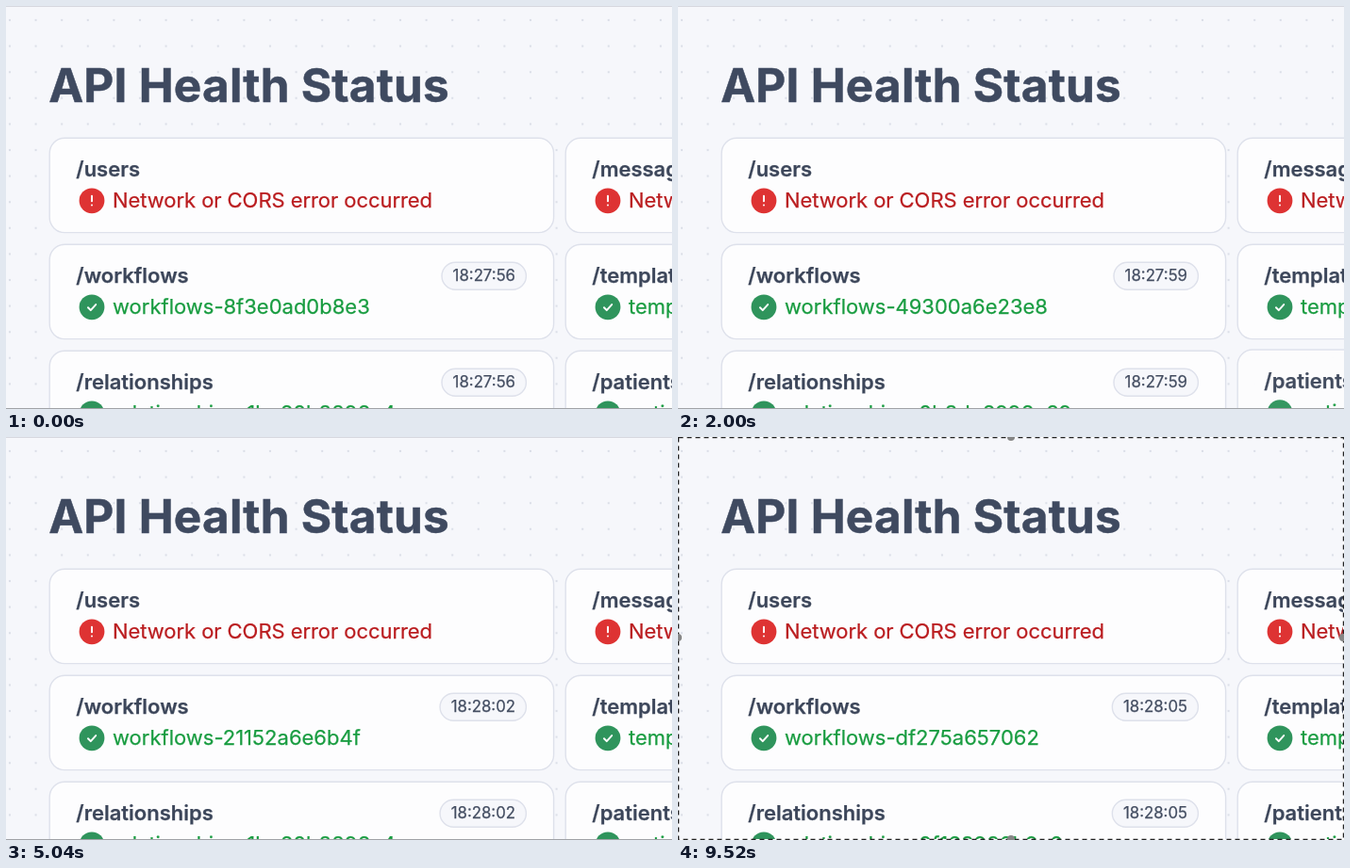
These frames come from a looping animation (706x428 px, 9600 ms). An HTML page:

```html
<!DOCTYPE html>
<html lang="en">
<head>
<meta charset="utf-8">
<title>API Health Status</title>
<style>
  html, body { margin: 0; width: 100%; height: 100%; overflow: hidden; background: #f6f7fb; }
  svg { display: block; width: 706px; height: 428px; }
  text { font-family: Inter, sans-serif; font-optical-sizing: none; white-space: pre;
         fill: currentColor; stroke: currentColor; stroke-width: .25; }
  .title { font-size: 49.5px; font-weight: 700; letter-spacing: .2px; color: #3f4a60; stroke-width: .5; }
  .label { font-size: 22px; font-weight: 600; color: #3c465a; }
  .message { font-size: 22px; font-weight: 400; color: #189c40; }
  .message.failed { color: #ba1c1f; letter-spacing: -.06px; }
  .time { font-size: 16.8px; font-weight: 400; color: #434d61; text-anchor: end; }
  .box { fill: #fdfdfe; stroke: #dee1eb; stroke-width: 1.4; }
  .pill { fill: #f6f7fb; }
  .mark { fill: none; stroke: #fff; stroke-width: 2; stroke-linecap: round; stroke-linejoin: round; }
  .flash { fill: none; stroke: #82c8c6; stroke-width: 3; }
</style>
</head>
<body>
<svg id="stage" viewBox="0 0 706 428">
  <defs>
    <pattern id="dots" x="-9.8" y="1.2" width="27.6" height="27.6" patternUnits="userSpaceOnUse">
      <circle cx="13.8" cy="13.8" r="1.2" fill="#dcdfe8"/>
    </pattern>
  </defs>
  <rect width="706" height="428" fill="#f6f7fb"/>
  <rect width="706" height="428" fill="url(#dots)"/>
  <text class="title" x="45.2" y="102.3">API Health Status</text>
  <g id="cards"></g>
  <rect width="706" height="1" fill="#d6d8df"/>
  <rect y="427" width="706" height="1" fill="#a0a2a6"/>
  <g id="flashes"><path class="flash" d="M0 1.5H706"/></g>
  <g id="selection">
    <rect x=".5" y=".5" width="705" height="427" fill="none" stroke="#fff"/>
    <rect x=".5" y=".5" width="705" height="427" fill="none" stroke="#222" stroke-width="1.4" stroke-dasharray="5 4"/>
    <g fill="#858585">
      <circle cx="353" cy="0" r="4"/><circle cx="353" cy="427" r="4"/>
      <circle cx="0" cy="213" r="4"/><circle cx="705" cy="213" r="4"/>
    </g>
  </g>
</svg>
<script>
const LOOP = 9600, STEP = 80;
const CLEAR_AT = 960, ENTER_AT = 1050, STAGGER = 120, ENTER_TIME = 370, DROP = 21.5;
const FLASH_STARTS = [4060, 7060], FLASH_TIME = 280, SELECT_AT = 8240;
const PITCH_X = 547, PITCH_Y = 113;

const snapshots = [
  { from: 0, time: '18:27:56', workflows: '8f3e0ad0b8e3', relationships: '1be60b8896e4' },
  { from: CLEAR_AT, time: '18:27:59', workflows: '49300a6e23e8', relationships: '0b8de6996e69' },
  { from: FLASH_STARTS[0], time: '18:28:02', workflows: '21152a6e6b4f', relationships: '1be60b8896e4' },
  { from: FLASH_STARTS[1], time: '18:28:05', workflows: 'df275a657062', relationships: '0f168986b9e0' }
];
const names = ['users', 'messages', 'workflows', 'templates', 'relationships', 'patients'];
const byId = id => document.getElementById(id);

function add(parent, tag, attrs, content = '') {
  const node = document.createElementNS('http://www.w3.org/2000/svg', tag);
  for (const key in attrs) node.setAttribute(key, attrs[key]);
  node.textContent = content;
  return parent.appendChild(node);
}

function makeCard(name, index) {
  const x = index % 2 * PITCH_X, y = Math.floor(index / 2) * PITCH_Y;
  const failed = index < 2;
  const group = add(byId('cards'), 'g');
  add(group, 'rect', { class: 'box', x: 46.2, y: 140.2, width: 534.4, height: 100.4, rx: 16 });
  add(group, 'text', { class: 'label', x: 74.3, y: 181 }, '/' + name);
  add(group, 'circle', { cx: 91, cy: 206.8, r: 13.4, fill: failed ? '#de3333' : '#2f945c' });
  add(group, 'path', { class: 'mark', d: failed ? 'M91 201.8v5.5M91 211.5v.1' : 'M87 207.3l2.8 2.8 5.4-6' });
  const message = add(group, 'text',
    { class: failed ? 'message failed' : 'message', x: 113, y: 214.2 },
    'Network or CORS error occurred');
  const flashes = add(byId('flashes'), 'g', { transform: `translate(${x} ${y})` });
  add(flashes, 'rect', { class: 'flash', x: 45.5, y: 139.5, width: 534, height: 100.5 });

  const card = { name, index, x, y, failed, group, message };
  if (!failed) {
    card.pill = add(group, 'rect', { class: 'box pill', y: 159.2, height: 29, rx: 14.5 });
    card.time = add(group, 'text', { class: 'time', x: 540, y: 179.3 });
    card.pillFlash = add(flashes, 'rect', { class: 'flash', y: 158.8, height: 29 });
  }
  return card;
}

function setData(card, data) {
  if (card.failed) return;
  card.message.textContent = `${card.name}-${data[card.name] || data.workflows}`;
  card.time.textContent = data.time;
  const width = card.time.getComputedTextLength() + 23;
  for (const box of [card.pill, card.pillFlash]) {
    box.setAttribute('x', 551.4 - width);
    box.setAttribute('width', width);
  }
}

const cards = names.map(makeCard);
const show = (id, visible) => byId(id).setAttribute('visibility', visible ? 'visible' : 'hidden');
let current;

function render(t) {
  const data = snapshots.filter(s => t >= s.from).pop();
  if (data !== current) cards.forEach(card => setData(card, data));
  current = data;

  for (const { group, index, x, y } of cards) {
    const progress = t < CLEAR_AT ? 1
      : Math.min(1, Math.max(0, (t - ENTER_AT - index * STAGGER) / ENTER_TIME));
    group.setAttribute('transform', `translate(${x} ${y - DROP * (1 - progress)})`);
    group.setAttribute('opacity', progress ** 0.65);
  }
  show('flashes', FLASH_STARTS.some(start => t >= start && t < start + FLASH_TIME));
  show('selection', t >= SELECT_AT);
}

const startTime = performance.now();
function tick() {
  const t = (performance.now() - startTime) % LOOP;
  render(t - t % STEP);
  requestAnimationFrame(tick);
}
tick();
</script>
</body>
</html>
```
